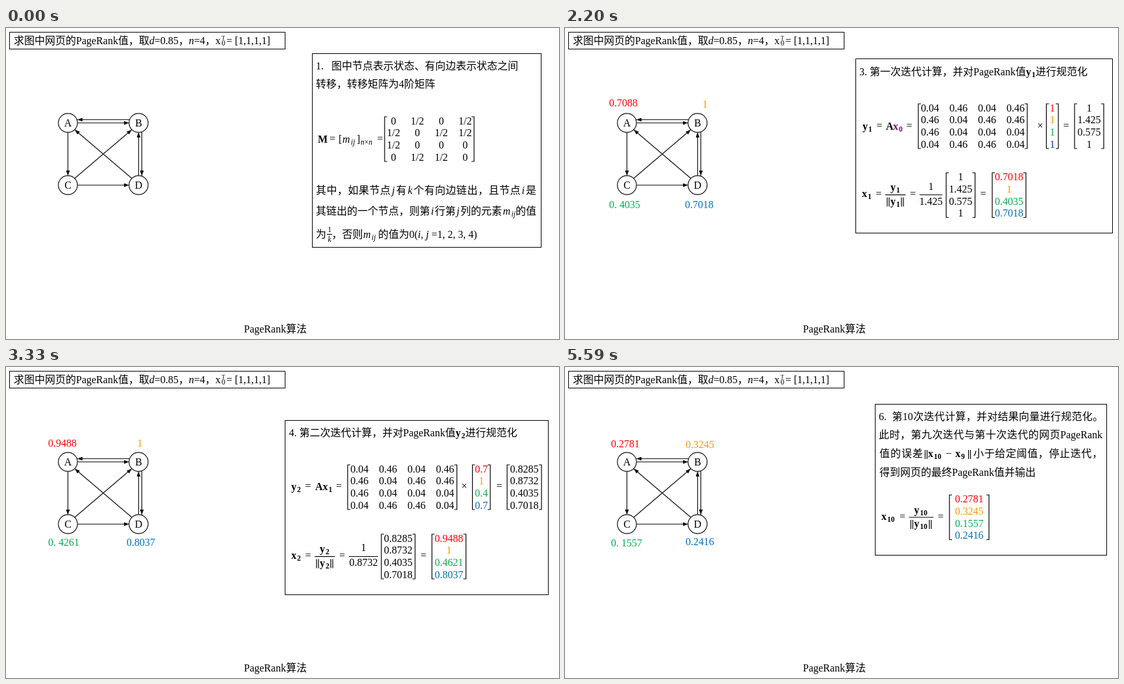
An HTML page that plays this animation: 853 px wide and 480 px high, repeating every 6.72 s.

```html
<!DOCTYPE html>
<html lang="zh-CN">
<head>
<meta charset="utf-8">
<title>PageRank算法</title>
<style>
  html, body { margin: 0; width: 100%; height: 100%; overflow: hidden; background: #fff; }
  svg { display: block; width: 853px; height: 480px; }
  text, .line { font: 16px "Liberation Serif", "Noto Sans CJK SC", serif; text-spacing-trim: space-all; }
  .line { line-height: 20px; text-align: justify; text-align-last: justify; white-space: nowrap; }
  .line i { padding: 0 1.5px; }
  .line sub { font-size: 11.5px; line-height: 0; vertical-align: -3px; font-style: italic; }
  .b { font-weight: bold; }
  .i { font-style: italic; }
  .s { font-size: 11.5px; }
  .t { font-size: 9px; }
  .m { text-anchor: middle; }
  .stroke { fill: none; stroke: #000; stroke-width: 1.2; }
  .frame { fill: none; stroke: #000; }
  .edge { fill: none; stroke: #111; stroke-width: 1.2; marker-end: url(#arrow); }
  .node { fill: #fff; stroke: #111; stroke-width: 1.2; }
  .step { visibility: hidden; animation: show 6720ms step-end infinite; }
  .step:first-of-type { animation-name: show-first; }
  @keyframes show { 0% { visibility: visible; } 16.815%, 100% { visibility: hidden; } }
  @keyframes show-first { 0% { visibility: visible; } 15.922%, 100% { visibility: hidden; } }
</style>
</head>
<body>
<svg id="stage" viewBox="0 0 853 480"></svg>
<script>
const RED = '#ff0000', ORANGE = '#ff9900', GREEN = '#00b050', BLUE = '#0070c0', PURPLE = '#800080';
const RANK_COLORS = [RED, ORANGE, GREEN, BLUE];

const text = (x, y, s, cls = '', fill = '#000') =>
  `<text x="${x}" y="${y}" class="${cls}" fill="${fill}">${s}</text>`;
const span = (s, cls) => `<tspan class="${cls}">${s}</tspan>`;
const path = d => `<path class="stroke" d="${d}"/>`;
const bar = (x1, x2, y) => path(`M${x1} ${y}H${x2}`);
const op = (x, y, s = '=') => text(x, y + 4, s, 'm');
const box = (x1, y1, x2, y2) =>
  `<rect class="frame" x="${x1 + .5}" y="${y1 + .5}" width="${x2 - x1}" height="${y2 - y1}"/>`;

// One justified line between x1 and x2 on baseline y.
const line = (x1, x2, y, html) =>
  `<foreignObject x="${x1}" y="${y - 15}" width="${x2 - x1}" height="24"><div class="line">${html}</div></foreignObject>`;

// Bold vector name with its index.
const vec = (x, y, name, index, fill) =>
  text(x, y, name, 'b', fill) + text(x + 9, y + 3, index, 'b s', fill);

const element = (x, y) => text(x, y, 'm', 'i') + text(x + 13, y + 3, 'ij', 'i s');

const doubleBar = (x, y) => path(`M${x} ${y - 11}v14M${x + 3} ${y - 11}v14`);

// Rows are separated by commas, cells by spaces; fills colours whole rows.
function matrix(left, right, top, rows, step = 0, fills = []) {
  let out = path(`M${left + 4} ${top}H${left}v69h4M${right - 4} ${top}H${right}v69h-4`);
  rows.split(',').forEach((row, r) => {
    const cells = row.split(' ');
    const first = (left + right) / 2 - step * (cells.length - 1) / 2;
    cells.forEach((cell, c) => {
      out += text(first + c * step, top + 11.8 + 18.6 * r, cell, 'm', fills[r]);
    });
  });
  return out;
}

// x_k = y_k / ||y_k|| =
function normalised(x, y, index) {
  const extra = (index.length - 1) * 6.5;
  const f = x + 36 + extra;
  return vec(x, y + 4, 'x', index) + op(x + 26 + extra, y) +
    bar(f, f + 31.5 + extra, y + .5) +
    vec(f + 8, y - 6, 'y', index) +
    doubleBar(f + 3, y + 15.5) + vec(f + 8, y + 15.5, 'y', index) + doubleBar(f + 25 + extra, y + 15.5) +
    op(f + 42.5 + extra, y);
}

const heading = (x, y, number, ordinal, index) =>
  text(x, y, `${number}. 第${ordinal}次迭代计算，并对PageRank值`) +
  vec(x + 257, y, 'y', index) + text(x + 272, y, '进行规范化');

// Values beside the nodes A, B, C, D as [x, y, value].
const ranks = list => list.map(([x, y, s], k) => text(x, y, s, '', RANK_COLORS[k])).join('');

const TRANSITION = '0 1/2 0 1/2,1/2 0 1/2 1/2,1/2 0 0 0,0 1/2 1/2 0';
const GENERAL = '0.04 0.46 0.04 0.46,0.46 0.04 0.46 0.46,0.46 0.04 0.04 0.04,0.04 0.46 0.46 0.04';
const ONES = Array(4).fill('1 1 1 1').join();

const edges = ['M190 141.5H110', 'M110 146.5H190', 'M95.5 161V228', 'M110 242.5H190',
  'M106 232L194 157', 'M194 232L106 157', 'M204.5 228V161', 'M209.5 160V228'];
const nodes = [['A', 95.5, 146.5], ['B', 204.5, 146.5], ['C', 95.5, 242.5], ['D', 204.5, 242.5]];

const fixed =
  `<defs><marker id="arrow" viewBox="0 0 8 6" refX="8" refY="3" markerWidth="8" markerHeight="6"
    markerUnits="userSpaceOnUse" orient="auto"><path d="M0 0L8 3L0 6z" fill="#111"/></marker></defs>` +
  box(5, 6, 430, 32) +
  text(12, 25, `求图中网页的PageRank值，取${span('d', 'i')}=0.85，${span('n', 'i')}=4，`) +
  text(323, 25, 'x') + text(332.5, 27, '0', 's') + text(332.5, 18, 'T', 't') +
  text(340, 25, '= [1,1,1,1]') +
  edges.map(d => `<path class="edge" d="${d}"/>`).join('') +
  nodes.map(([name, x, y]) =>
    `<circle class="node" cx="${x}" cy="${y}" r="14.7"/>` + text(x, y + 5, name, 'm')).join('') +
  text(367, 470, 'PageRank算法');

const steps = [
  box(472, 39, 825, 338) +
  text(478, 64, '1.') + text(502, 64, '图中节点表示状态、有向边表示状态之间') +
  text(478, 92, '转移，转移矩阵为4阶矩阵') +
  text(481, 177, 'M', 'b') + op(503.5, 172) + text(513, 177, '[') + element(519, 177) +
  text(541, 177, ']') + text(547, 180, `${span('n', 'i')}×${span('n', 'i')}`, 's') + op(577, 172) +
  matrix(584, 722, 137, TRANSITION, 36.8) +
  line(478, 818, 256, '其中，如果节点<i>j</i>有<i>k</i>个有向边链出，且节点<i>i</i>是') +
  line(478, 818, 288, '其链出的一个节点，则第<i>i</i>行第<i>j</i>列的元素<i>m</i><sub>ij</sub>的值') +
  text(478, 324, '为') + text(499, 315, '1', 's m') + bar(495, 503, 318.5) + text(499, 330, 'k', 'i s m') +
  text(502.5, 324, '，否则') + element(551, 324) + text(574, 324, '的值为') +
  text(622, 324, `0(${span('i, j', 'i')} =1, 2, 3, 4)`),

  box(430, 51, 841, 366) +
  ranks([[89, 123, '1'], [204, 123, '1'], [89, 278, '1'], [199.5, 277, '1']]) +
  text(436.5, 69, `2. 计算一般转移矩阵${span('A', 'b')}`) +
  text(437, 113, 'A', 'b') + op(458.5, 108) + text(468, 113, 'd', 'i', RED) + text(477, 113, 'M', 'b') +
  op(499, 108, '+') + text(511, 101, '1') + op(527, 97, '−') + text(538.5, 101, 'd', 'i', RED) +
  bar(510, 548, 107.5) + text(529, 123, 'n', 'b i m', GREEN) + text(550.5, 113, 'E', 'b') +
  op(442, 201) + text(453, 205.5, '0.85', '', RED) + op(490.5, 201, '×') +
  matrix(502.5, 639.5, 166, TRANSITION, 36.8) + op(652, 201, '+') +
  text(684.5, 193, '1−0.85', 'm') + bar(662, 707, 200.5) + text(684.5, 216, '4', 'm', GREEN) +
  op(716, 201, '×') + matrix(732.5, 816.5, 166, ONES, 24) +
  op(442, 307) + matrix(456.5, 624.5, 272, GENERAL, 43.9),

  box(448, 47, 844, 316) +
  ranks([[68, 121, '0.7088'], [212, 123, '1'], [68, 278, '0. 4035'], [185, 278, '0.7018']]) +
  heading(454, 73, 3, '一', '1') +
  vec(459, 157, 'y', '1') + op(485, 152) + text(495, 157, 'A', 'b') + vec(506, 157, 'x', '0', PURPLE) +
  op(531, 152) + matrix(545, 713, 117, GENERAL, 44) + op(733, 152, '×') +
  matrix(742.5, 761, 117, '1,1,1,1', 0, [RED, ORANGE, GREEN, '#0033cc']) + op(773, 152) +
  matrix(786, 831, 117, '1,1.425,0.575,1') +
  normalised(458, 257, '1') +
  text(564.5, 250, '1', 'm') + bar(547, 582, 257.5) + text(564.5, 272.5, '1.425', 'm') +
  matrix(588, 632.5, 223.5, '1,1.425,0.575,1') + op(645, 257) +
  matrix(659, 711, 223.5, '0.7018,1,0.4035,0.7018', 0, RANK_COLORS),

  box(430, 82, 836, 351) +
  ranks([[65, 123, '0.9488'], [202.5, 123, '1'], [65, 276, '0. 4261'], [186, 276, '0.8037']]) +
  heading(436.5, 107, 4, '二', '2') +
  vec(440, 190, 'y', '2') + op(466, 185) + text(477, 190, 'A', 'b') + vec(488.5, 190, 'x', '1') +
  op(513.5, 185) + matrix(527, 695.5, 151, GENERAL, 44) + op(707, 185, '×') +
  matrix(719.5, 747, 151, '0.7,1,0.4,0.7', 0, RANK_COLORS) + op(761, 185) +
  matrix(773, 826, 151, '0.8285,0.8732,0.4035,0.7018') +
  normalised(440, 292, '2') +
  text(551.5, 284, '1', 'm') + bar(529, 574, 292.5) + text(551.5, 307, '0.8732', 'm') +
  matrix(579, 631, 258, '0.8285,0.8732,0.4035,0.7018') + op(644, 292) +
  matrix(657, 709.5, 258, '0.9488,1,0.4621,0.8037', 0, RANK_COLORS),

  box(479, 55, 828, 230) +
  ranks([[70, 122, '0.2781'], [187.5, 124, '0.3245'], [70, 276, '0. 1558'], [182, 276, '0.2415']]) +
  line(485, 822, 80, '5.&nbsp; 继续迭代规范化，至第9次迭代计算，并对') +
  text(485, 108, 'PageRank值') + vec(566, 108, 'y', '9') + text(581, 108, '进行规范化') +
  normalised(488.5, 171.5, '9') +
  matrix(580, 641, 137.5, '0.2781,0.3245,0.1558,0.2415', 0, RANK_COLORS),

  box(478, 57, 835, 290) +
  ranks([[71, 124, '0.2781'], [186, 125, '0.3245'], [71, 277, '0. 1557'], [186, 275, '0.2416']]) +
  line(484, 830, 82, '6.&nbsp; 第10次迭代计算，并对结果向量进行规范化。') +
  line(484, 829, 110, '此时，第九次迭代与第十次迭代的网页PageRank') +
  line(485, 552, 139, '值的误差') +
  doubleBar(555.5, 139) + vec(560, 139, 'x', '10') + op(592, 135, '−') + vec(602, 139, 'x', '9') +
  doubleBar(622.5, 139) + line(630, 829, 139, '小于给定阈值，停止迭代，') +
  text(485, 168, '得到网页的最终PageRank值并输出') +
  normalised(488, 231.5, '10') +
  matrix(593, 654, 197.5, '0.2781,0.3245,0.1557,0.2416', 0, RANK_COLORS),
];

const group = (content, k) =>
  `<g class="step" style="animation-delay:${k ? 1130 * k - 60 - 6720 : 0}ms">${content}</g>`;

document.getElementById('stage').innerHTML = fixed + steps.map(group).join('');
</script>
</body>
</html>
```
